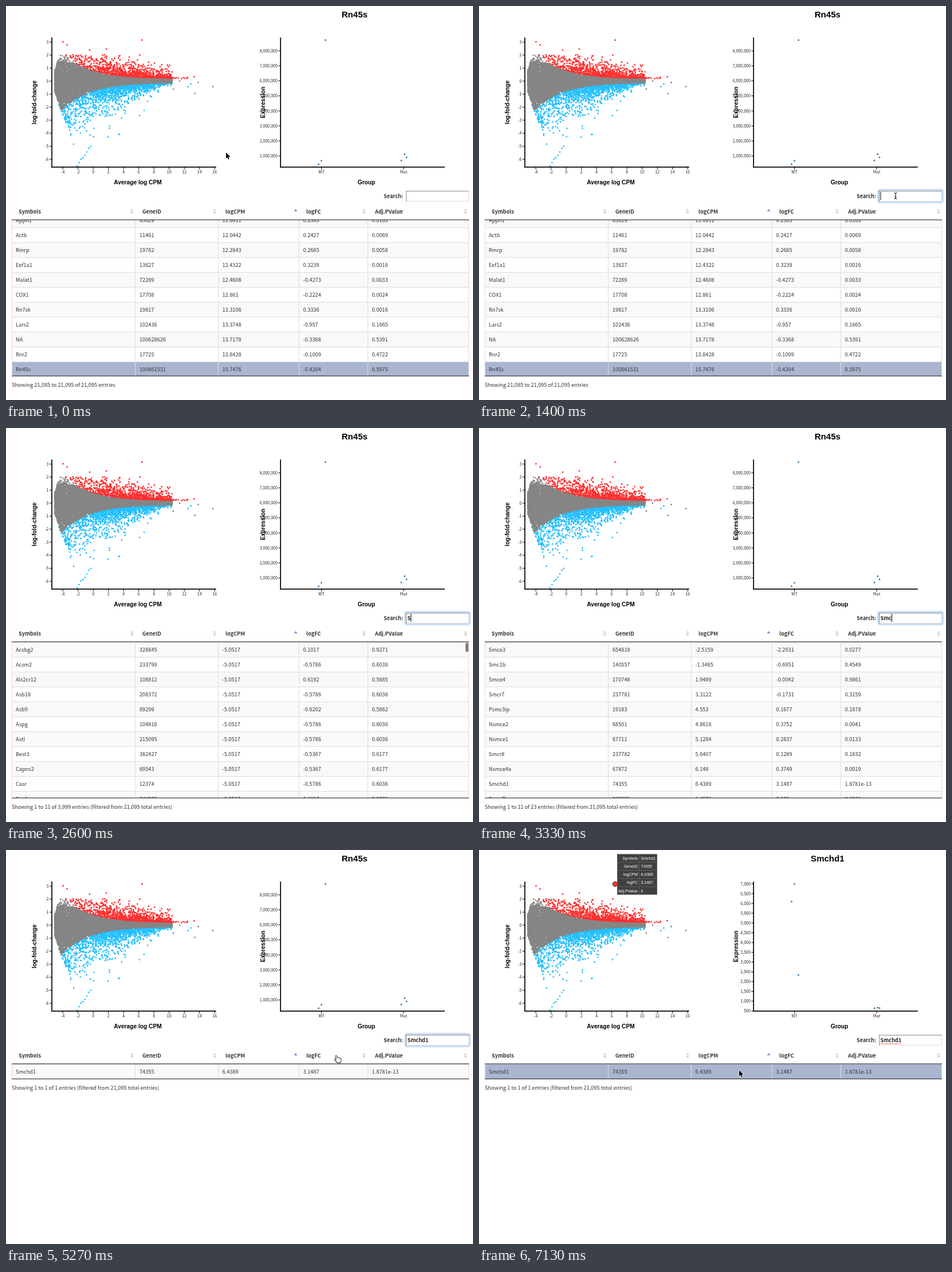
An HTML page with a canvas that plays this animation: 815 by 687 pixels, repeating every 7.19 s.

```html
<!DOCTYPE html>
<html lang="en">
<head>
<meta charset="utf-8">
<title>Gene expression explorer</title>
<style>
html, body { margin: 0; width: 100%; height: 100%; overflow: hidden; background: #fff; }
canvas { display: block; }
</style>
</head>
<body>
<canvas id="stage" width="815" height="687"></canvas>
<script>
const W = 815, H = 687, LOOP = 7190, STEP = 1000 / 15;
const BLUR = 5725, PICK = 6060;
const stage = document.getElementById('stage');
let g = stage.getContext('2d');

const SANS = '"Noto Sans CJK SC", "Noto Sans CJK JP", "Noto Sans CJK", sans-serif';
const ARIAL = '"Liberation Sans", Arial, sans-serif';
const BODY = '9.2px ' + SANS, BOLD = 'bold 9.2px ' + SANS, TICK = '7px ' + SANS;
const LABEL = 'bold 10.2px ' + ARIAL, TITLE = 'bold 15px ' + ARIAL, TIP = '7px ' + ARIAL;
const RED = '#ff3030', BLUE = '#22bfff', GRAY = '#858585';

function text(s, x, y, font, color = '#333', align = 'left') {
  g.font = font; g.fillStyle = color; g.textAlign = align;
  g.fillText(s, x, y);
}
function upright(s, x, y) {
  g.save(); g.translate(x, y); g.rotate(-Math.PI / 2);
  text(s, 0, 0, LABEL, '#000', 'center');
  g.restore();
}
function rect(x, y, w, h, color) { g.fillStyle = color; g.fillRect(x, y, w, h); }
function dots(points, color, r = 1.4) {
  g.fillStyle = color; g.beginPath();
  for (const [x, y] of points) { g.moveTo(x + r, y); g.arc(x, y, r, 0, 7); }
  g.fill();
}
function shape(points, fill, stroke, width = 1) {
  g.beginPath();
  points.forEach(p => g.lineTo(...p));
  g.closePath(); g.lineJoin = 'round';
  if (stroke) { g.strokeStyle = stroke; g.lineWidth = width; g.stroke(); }
  g.fillStyle = fill; g.fill();
}
const clamp = u => Math.max(0, Math.min(1, u));
const smooth = u => u * u * (3 - 2 * u);

// ---- left plot ----
let seed = 7;
function rnd() {
  seed = (seed * 1664525 + 1013904223) >>> 0;
  return seed / 4294967296;
}

// Spread shrinks with abundance; points beyond the threshold are coloured
function cloud() {
  const up = [], down = [], flat = [], mid = 131;
  for (let i = 0; i < 14000; i++) {
    const x = 85 + 205 * rnd() ** 1.2, above = rnd() < .5;
    const threshold = 2 + 46 * Math.exp((100 - x) / 46);
    const reach = Math.max(3, above ? 40 - (x - 95) * .16 : 64 - (x - 100) * .34);
    const limit = 18 + (above ? 3.2 : 2.9) * (x - 85);
    const d = rnd() < .45 ? rnd() * Math.min(threshold, reach * .85) : -reach * .4 * Math.log(1 - rnd());
    if (d > Math.min(limit, above ? 46 : 98)) continue;
    const list = d < threshold ? flat : above ? up : down;
    list.push([x, above ? mid - d : mid + d]);
  }
  for (let i = 0; i < 12; i++) up.push([291 + 27 * rnd(), 127 - 3 * rnd()]);
  for (let i = 0; i < 40; i++) {
    const d = 46 * rnd(), lane = i % 3 * 3.5;
    down.push([92 + lane + d / 2.27, 173 + d]);
  }
  for (let i = 0; i < 8; i++) down.push([124 + 3.4 * i, 276 - 5 * i + 5 * rnd()]);
  up.push([237.5, 59.5], [99.5, 62.5], [106.5, 68], [175, 75], [146, 77], [328.5, 123.5]);
  flat.push([303, 131], [335.5, 133.5], [329.5, 152.5], [361, 140.5], [292, 145]);
  down.push([322.5, 136], [317.5, 140.5], [196.5, 224], [233, 191], [118, 241]);
  dots(down, BLUE); dots(up, RED); dots(flat, GRAY);
}

function axes(x) {
  rect(x - 1, 55, 1.7, 226.5, '#000');
  rect(x - 1, 280, 287.5, 1.7, '#000');
}
function tickX(s, x) {
  rect(x - .5, 281, 1, 4, '#000');
  text(s, x, 292, TICK, '#222', 'center');
}
function tickY(s, x, y) {
  rect(x - 4, y - .5, 4, 1, '#000');
  text(s, x - 5.5, y + 2.6, TICK, '#222', 'right');
}

// Static, so drawn once
const plot = document.createElement('canvas');
plot.width = W; plot.height = H;
const screen = g;
g = plot.getContext('2d');
cloud();
axes(80.2);
for (let v = -4; v <= 16; v += 2) tickX(v, 152.2 + 13.25 * v);
for (let v = -6; v <= 3; v++) tickY(v, 80, 131 - 22.7 * v);
text('Average log CPM', 230, 311, LABEL, '#000', 'center');
upright('log-fold-change', 52.5, 168);
g = screen;

// ---- right plot ----
// x, y before, y after
const samples = [[557.5, 59.5, 218], [550.5, 270, 59.5], [545.5, 276, 90],
  [690, 269.5, 276], [695.7, 258.5, 275], [699, 264, 275.7]];
const oldY = v => 287.7 - 26.2e-6 * v;
const newY = v => 280.6 - (v - 500) * .03409;

function expression(t) {
  const chosen = t >= PICK;
  const u = clamp(.629 + (t - PICK) / 250);
  const p = chosen ? 1 - 4 * (1 - u) ** 3 : 0;
  text(chosen ? 'Smchd1' : 'Rn45s', 608.3, 20.2, TITLE, '#000', 'center');
  axes(479.3);
  tickX('WT', 550.5); tickX('Mut', 694);
  const unit = chosen ? 500 : 1e6, count = chosen ? 14 : 8;
  for (let i = 1; i <= count; i++) {
    const v = i * unit;
    tickY(v.toLocaleString('en-US'), 479.3, oldY(v) + p * (newY(v) - oldY(v)));
  }
  dots(samples.map(([x, a, b]) => [x, a + (b - a) * p]), '#2874ad');
  text('Group', 629, 311, LABEL, '#000', 'center');
  upright('Expression', 452.3, 168);
}

// ---- table ----
const rows = s => s.trim().split('\n').map(line => line.trim().split(' '));
const abundant = rows(`Rpph1 85029 11.6911 0.2365 0.0163
  Actb 11461 12.0442 0.2427 0.0069
  Rmrp 19782 12.2843 0.2685 0.0058
  Eef1a1 13627 12.4322 0.3239 0.0016
  Malat1 72289 12.4608 -0.4273 0.0033
  COX1 17708 12.861 -0.2224 0.0024
  Rn7sk 19817 13.3106 0.3336 0.0016
  Lars2 102436 13.3748 -0.957 0.1665
  NA 100628626 13.7178 -0.3368 0.5391
  Rnr2 17725 13.8428 -0.1009 0.4722
  Rn45s 100861531 15.7476 -0.4204 0.5975`);
// The rarest genes share one logCPM and a few logFC / p-value pairs
const rare = rows(`Acsbg2 328845 0.1017 0.9271
  Acsm2 233799
  Als2cr12 108812 0.6192 0.5685
  Asb18 208372
  Asb9 69299 -0.6202 0.5862
  Aspg 104816
  Astl 215095
  Best3 382427 -0.5367 0.6177
  Capns2 69543 -0.5367 0.6177
  Casr 12374
  Ces1a 244595 0.1017 0.9271`)
  .map(([name, id, fc = '-0.5786', p = '0.6036']) => [name, id, '-5.0517', fc, p]);
const others = rows(`Smco3 654818 -2.5159 -2.2931 0.0277
  Smc1b 140557 -1.3485 -0.6951 0.4549
  Smco4 170748 1.9489 -0.0042 0.9861
  Smcr7 237781 3.3122 -0.1731 0.3159
  Psmc3ip 19183 4.553 0.1677 0.1878
  Nsmce2 68501 4.8616 0.3752 0.0041
  Nsmce1 67711 5.1284 0.2837 0.0133
  Smcr8 237782 5.6407 0.1289 0.1832
  Nsmce4a 67872 6.148 0.3749 0.0019
  Smchd1 74355 6.4389 3.1487 1.8781e-13
  Smcr7l 239555 6.4576 0.129 0.2201`);

const keys = [[0, ''], [2395, 'S'], [3060, 'Sm'], [3195, 'Smc'], [3660, 'Smch'], [3995, 'Smchd'], [4525, 'Smchd1']];
const totals = { S: '3,999', Sm: '164', Smc: '23' };
const typedAt = t => keys.filter(k => k[0] <= t).pop();

function find(query) {
  if (!query) return abundant;
  const has = ([name]) => name.toLowerCase().includes(query.toLowerCase());
  return [...rare, ...others].filter(has).slice(0, 11);
}

const heads = [['Symbols', 22, 219.5], ['GeneID', 238, 364], ['logCPM', 383, 505.5], ['logFC', 524, 625], ['Adj.PValue', 644, 802]];
const cellX = [17, 233, 377.5, 518.5, 638.5], edges = [10, 225, 370, 511, 631, 807];
const sortMark = (x, y, dir, color) => shape([[x - 3, y], [x + 3, y], [x, y - 4 * dir]], color);

function table(t) {
  for (const [s, x, icon] of heads) {
    text(s, x, 361.7, BOLD);
    if (s === 'logCPM') sortMark(icon, 358, 1, '#6b93cf');
    else { sortMark(icon, 357.5, 1, '#d3d3d3'); sortMark(icon, 359, -1, '#d3d3d3'); }
  }
  const lag = 65, [since, query] = typedAt(Math.max(0, t - lag)), data = find(query);
  const top = query ? 373 : 360, end = data.length > 1 ? 645 : 399;
  const picked = query ? t >= PICK && 'Smchd1' : 'Rn45s';
  g.save();
  g.beginPath(); g.rect(0, 373, W, end - 373); g.clip();
  data.forEach((cells, i) => {
    const y = top + 26 * i;
    rect(10, y, 798, 26, cells[0] === picked ? '#aab6d0' : i % 2 ? '#fff' : '#f9f9f9');
    rect(10, y, 798, 1, '#ddd');
    edges.forEach(x => rect(x, y, 1, 26, '#ddd'));
    cells.forEach((s, c) => text(s, cellX[c], y + 16.5, BODY));
  });
  if (query === 'S' || query === 'Sm') {
    g.globalAlpha = clamp(1 - (t - lag - since - 145) / 200);
    g.fillStyle = '#7d7d7d';
    g.beginPath(); g.roundRect(802, 374.5, 5, 16, 2.5); g.fill();
  }
  g.restore();
  rect(10, 372.4, 798, 1, '#111');
  rect(10, end - .4, 798, 1, '#111');
  const total = totals[query] || '1';
  text(query ? `Showing 1 to ${data.length} of ${total} entries (filtered from 21,095 total entries)`
    : 'Showing 21,085 to 21,095 of 21,095 entries', 10, end + 18.6, BODY);
}

function glow(grow, color, width) {
  g.strokeStyle = color; g.lineWidth = width;
  g.beginPath(); g.roundRect(697 - grow, 321 - grow, 112 + 2 * grow, 21 + 2 * grow, 3); g.stroke();
}

function search(t) {
  const focus = t >= 1395 && t < BLUR;
  text('Search:', 659, 335, BOLD);
  if (focus) { glow(.5, '#dcebfa', 4); glow(0, '#bfdaf6', 2); }
  rect(698, 322.4, 110, 18.4, '#dcdcdc');
  rect(698, 322.4, 110, 1.2, '#909090');
  rect(698, 322.4, 1.2, 18.4, '#909090');
  rect(699.2, 323.6, 107.8, 16.2, '#fff');
  const typed = typedAt(t)[1];
  text(typed, 700.5, 335, BOLD, '#222');
  const w = g.measureText(typed).width;
  const blinkOff = t > 1725 && t < 1930 || t > 4995;
  if (focus && !blinkOff) rect(700.5 + w, 324, 1, 14, '#000');
  if (t >= BLUR) for (let x = 701; x < 700 + w; x += 2) rect(x, 337, 1.1, 1.3, '#e2403c');
}

function tooltip() {
  g.beginPath(); g.arc(237.5, 59.5, 4.3, 0, 7);
  g.fillStyle = RED; g.fill();
  g.strokeStyle = '#333'; g.lineWidth = 1; g.stroke();
  rect(241, 7, 70, 71, '#404040');
  g.setLineDash([2, 1.5]); g.strokeStyle = '#8a8a8a'; g.lineWidth = .7;
  g.beginPath(); g.rect(241.5, 7.5, 69, 70);
  g.moveTo(279.5, 7); g.lineTo(279.5, 78);
  const gene = find('Smchd1')[0];
  heads.forEach(([name], i) => {
    const y = 7 + 14.25 * i;
    g.moveTo(241, y); g.lineTo(311, y);
    text(name, 277, y + 9.6, TIP, '#fff', 'right');
    text(name === 'Adj.PValue' ? '0' : gene[i], 282.5, y + 9.6, TIP, '#fff');
  });
  g.stroke(); g.setLineDash([]);
}

// ---- pointer ----
function pointer(t) {
  if (t < 1195) {
    const u = smooth(clamp((t - 400) / 733));
    return [384 + 313 * u, 255.5 + 79 * u];
  }
  if (t < 1330) return [718, 332];
  if (t < 2395) return [727, 331];
  if (t < 4995) return null;
  const u = smooth(clamp((t - 4933) / 620));
  return [727 - 273 * u, 331 + 53 * u];
}

function beam() {
  g.strokeStyle = '#111'; g.lineWidth = 1;
  g.beginPath();
  for (const y of [-5.5, 5.5]) {
    g.moveTo(-2.5, y); g.quadraticCurveTo(0, y, 0, y * .6);
    g.quadraticCurveTo(0, y, 2.5, y);
  }
  g.moveTo(0, -4); g.lineTo(0, 4);
  g.moveTo(-1.5, 1.5); g.lineTo(1.5, 1.5);
  g.stroke();
}
const hand = [[.5, 0], [2, 0], [3.5, 4], [5, 3.5], [7.2, 4], [9.2, 5], [9.8, 6.5],
  [8.5, 11.5], [3.5, 11.5], [-1, 6.5], [-.3, 5.4], [2, 6.8]];
const arrow = [[0, 0], [0, 10.5], [2.4, 8.3], [4, 12], [5.8, 11.2], [4.2, 7.7], [7.4, 7.5]];

function drawPointer(t) {
  const pos = pointer(t);
  if (!pos) return;
  const [x, y] = pos;
  g.save(); g.translate(x, y);
  if (x > 698 && y > 322 && y < 341) beam();
  else if (y > 347 && y < 373) { g.translate(0, -1.5); shape(hand, '#fff', '#111', 1.8); }
  else shape(arrow, '#000', '#fff', 1.5);
  g.restore();
}

function draw(t) {
  rect(0, 0, W, H, '#fff');
  g.drawImage(plot, 0, 0);
  expression(t);
  search(t);
  table(t);
  if (t >= PICK) tooltip();
  drawPointer(t);
}

// The picture advances fifteen times a second
const start = performance.now();
let last = -1;
function tick() {
  const step = Math.floor(((performance.now() - start) % LOOP + 4) / STEP);
  if (step !== last) draw((last = step) * STEP);
  requestAnimationFrame(tick);
}
tick();
</script>
</body>
</html>
```
